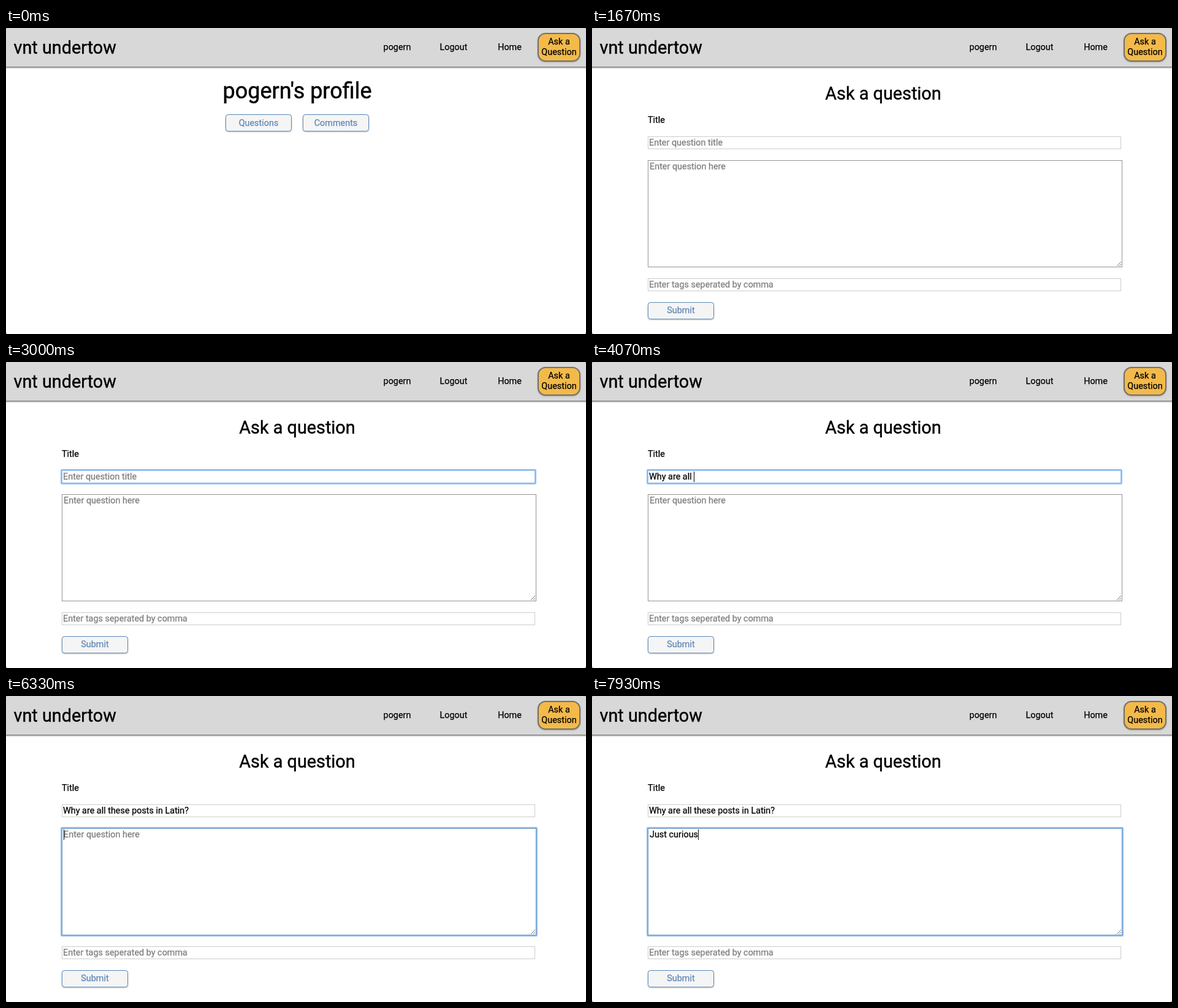
Animation, 946 px wide and 500 px high, one loop 8 s. Source, as an HTML page:

```html
<!DOCTYPE html>
<html lang="en">
<head>
<meta charset="utf-8">
<title>Ask a question</title>
<style>
  html, body { margin: 0; width: 100%; height: 100%; overflow: hidden; background: #666; }
  svg { display: block; width: 946px; height: 500px; background: #fff; border-radius: 3px; }
  text { font: 14.4px Roboto, sans-serif; white-space: pre; stroke: currentColor; stroke-width: .25px; }
  .mid { text-anchor: middle; }
  .h1 { font-size: 36px; stroke-width: .5px; }
  .h2 { font-size: 28.8px; stroke-width: .4px; }
  .hint { fill: #7d7d7d; color: #7d7d7d; }
  .header { fill: #d8d8d8; }
  .edge { fill: #8c8c8c; filter: drop-shadow(0 1px 1px #0008); }
  .ask { fill: #f3ba4a; stroke: #747068; stroke-width: 2; filter: drop-shadow(0 1px 1px #0004); }
  .button rect { fill: #f5f5f5; stroke: #5b8bb9; filter: drop-shadow(0 1px 1px #0004); }
  .button text { fill: #5f87b7; color: #5f87b7; }
  .field { fill: #fff; stroke: #ccc; }
  .area { fill: #fff; stroke: #949494; }
  .ring { fill: none; stroke: #92c0f0; stroke-width: 3; }
</style>
</head>
<body>
<svg viewBox="0 0 946 500">
  <rect class="edge" x="-5" y="60" width="956" height="4"/>
  <rect class="header" width="946" height="63"/>
  <text class="h2" x="12.5" y="42">vnt undertow</text>
  <g class="mid">
    <text x="638" y="36">pogern</text>
    <text x="730" y="36">Logout</text>
    <text x="821.5" y="36">Home</text>
    <rect id="askRing" class="ring" x="865.5" y="6.5" width="73" height="50" rx="1" style="stroke:#8bb5e8"/>
    <rect class="ask" x="868" y="9" width="68" height="45" rx="12"/>
    <text x="902" y="27">Ask a</text>
    <text x="902" y="44">Question</text>
  </g>

  <g id="profile">
    <text class="h1 mid" x="475" y="114.5">pogern's profile</text>
    <g class="button mid">
      <rect x="358.5" y="141.5" width="107" height="27" rx="4"/>
      <text x="412" y="160">Questions</text>
      <rect x="484.5" y="141.5" width="107" height="27" rx="4"/>
      <text x="538" y="160">Comments</text>
    </g>
  </g>

  <g id="form">
    <text class="h2 mid" x="475" y="117">Ask a question</text>
    <text x="91" y="155">Title</text>
    <rect class="field" x="91.5" y="177.5" width="771" height="20"/>
    <rect id="titleRing" class="ring" x="90.5" y="176.5" width="773" height="22" rx="1"/>
    <text id="title" x="93" y="192"></text>
    <rect id="bodyRing" class="ring" x="90.5" y="215.5" width="775" height="176" rx="1"/>
    <rect id="area" class="area" x="91.5" y="216.5" width="773" height="174"/>
    <path d="M856 389l7-7M860 389l3-3" stroke="#777"/>
    <text id="body" x="94" y="231"></text>
    <rect class="field" x="91.5" y="409.5" width="771" height="20"/>
    <text class="hint" x="93" y="424">Enter tags seperated by comma</text>
    <g class="button mid">
      <rect x="91.5" y="448.5" width="107" height="27" rx="4"/>
      <text x="145" y="466">Submit</text>
    </g>
    <rect id="caret" width="1" height="17"/>
  </g>
</svg>
<script>
const LOOP = 8000, KEY_MS = 78, BLINK_MS = 500;
const ASK_FOCUS = 600, FORM_OPEN = 1250, TITLE_FOCUS = 2400, BODY_FOCUS = 6200;
const inputs = {
  title: { text: "Why are all these posts in Latin?", hint: "Enter question title", start: 3160, focus: TITLE_FOCUS },
  body: { text: "Just curious", hint: "Enter question here", start: 6980, focus: BODY_FOCUS }
};
const $ = id => document.getElementById(id);
const show = (id, on) => $(id).style.display = on ? "" : "none";

function typeInto(id, t) {
  const { text, hint, start } = inputs[id];
  const count = Math.max(0, Math.min(text.length, Math.floor((t - start) / KEY_MS) + 1));
  $(id).textContent = count ? text.slice(0, count) : hint;
  $(id).setAttribute("class", count ? "" : "hint");
  return count;
}

function placeCaret(id, count, t) {
  const { focus, start } = inputs[id];
  const node = $(id);
  // Blinking restarts at every keystroke.
  const since = count ? t - start - (count - 1) * KEY_MS : t - focus;
  const width = count ? node.getComputedTextLength() : 0;
  $("caret").setAttribute("x", Math.round(+node.getAttribute("x") + width));
  $("caret").setAttribute("y", node.getAttribute("y") - 13);
  show("caret", t >= focus && since % (2 * BLINK_MS) < BLINK_MS);
}

function draw(t) {
  const formOpen = t >= FORM_OPEN, inBody = t >= BODY_FOCUS;
  show("profile", !formOpen);
  show("form", formOpen);
  show("askRing", t >= ASK_FOCUS && !formOpen);
  show("titleRing", t >= TITLE_FOCUS && !inBody);
  show("bodyRing", inBody);
  $("area").style.stroke = inBody ? "#6b94c0" : "";
  const counts = { title: typeInto("title", t), body: typeInto("body", t) };
  const active = inBody ? "body" : "title";
  placeCaret(active, counts[active], t);
}

const origin = performance.now();
function frame() {
  draw((performance.now() - origin) % LOOP);
  requestAnimationFrame(frame);
}
frame();
</script>
</body>
</html>
```
